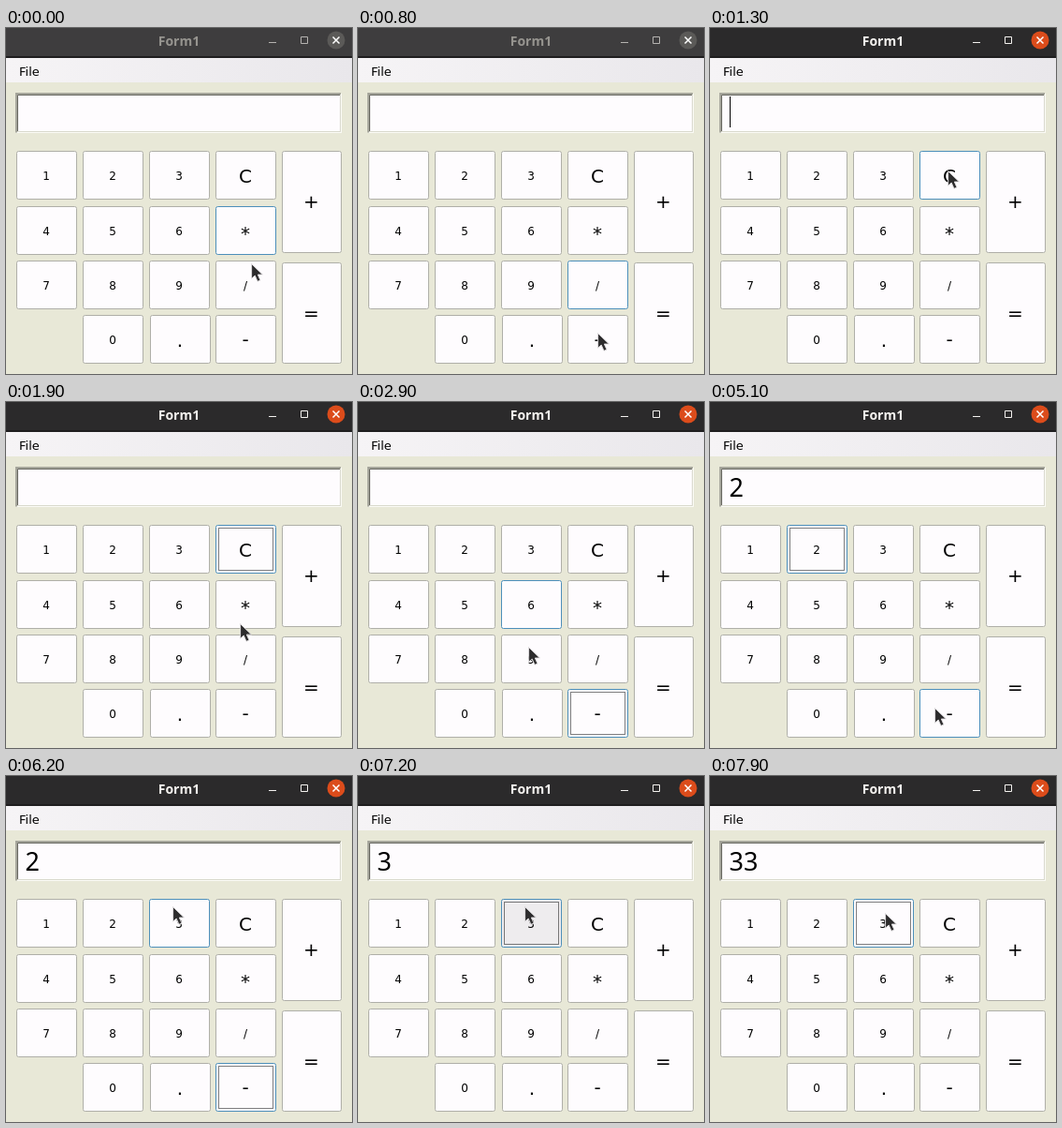
Recreate the animation shown at these times as an HTML page. Size 370 by 369 pixels, loop 8 s.

```html
<!DOCTYPE html>
<html lang="en">
<head>
<meta charset="utf-8">
<title>Calculator</title>
<style>
  html, body { margin: 0; width: 100%; height: 100%; overflow: hidden; background: #e8e8d7; }
  svg { display: block; }
  text { font-family: "DejaVu Sans", sans-serif; fill: #000; }
  .title { font: bold 14px "Noto Sans", sans-serif; fill: #96948f; }
  .bar { fill: #3e3d3e; }
  .close { fill: #5b5a58; }
  .icon { fill: none; stroke: #b5b3b0; }
  .active .title, .active .cross { fill: #f4f2ef; }
  .active .bar { fill: #2b2a2b; }
  .active .close { fill: #dc4c1b; }
  .active .icon { stroke: #f4f2ef; }
  .value { font: 27px "Noto Sans", sans-serif; }
  .key rect { fill: #fefcfe; stroke: #afafa8; }
  .key text { text-anchor: middle; }
  .key .ring { fill: none; stroke: #000; stroke-dasharray: 1 1; visibility: hidden; }
  .key.hover .face, .key.focus .face { stroke: #4d8fba; }
  .key.focus .ring { visibility: visible; }
  .key.press .face { fill: #eeecee; }
</style>
</head>
<body>
<svg id="stage" width="370" height="369" viewBox="0 0 370 369">
  <defs>
    <linearGradient id="menu">
      <stop offset="0" stop-color="#f6f4f6"/>
      <stop offset="1" stop-color="#e9e7eb"/>
    </linearGradient>
  </defs>
  <rect width="370" height="369" fill="#e8e8d7"/>
  <rect class="bar" width="370" height="32"/>
  <rect y="30" width="370" height="2" fill="#1f1e1f"/>
  <text class="title" x="185" y="19" text-anchor="middle">Form1</text>
  <path class="icon" d="M281 15.5h8M315.5 9.5h7v7h-7z"/>
  <circle class="close" cx="353" cy="13" r="9.5"/>
  <path d="M349.5 9.5l7 7m0-7l-7 7" stroke="#fff" stroke-width="1.5"/>
  <rect y="32" width="370" height="26" fill="url(#menu)"/>
  <text x="14" y="51" font-size="13">File</text>

  <rect x="11" y="70" width="348" height="42" fill="#fbfbf6"/>
  <path d="M11 111.5V70H358" fill="none" stroke="#a5a59b" stroke-width="2"/>
  <rect x="12" y="71" width="346" height="40" fill="#d9d9cd"/>
  <path d="M12.5 110V71.5H357" fill="none" stroke="#666660"/>
  <rect x="13" y="72" width="344" height="38" fill="#fefcfe"/>
  <text id="value" class="value" x="20.5" y="100.5"></text>
  <path id="caret" d="M21.5 73V106" stroke="#000"/>

  <g id="keys"></g>
  <path id="cursor" d="M.6 .6V16.2L4.2 13L7 19.3L10 18L7.3 12H12.4Z"
    fill="#2d2c2d" stroke="#e6e4e6" stroke-width=".9" stroke-linejoin="round"/>
</svg>
<script>
const LOOP = 8000, STEP = 100;
const $ = id => document.getElementById(id);

// Keypad: label, x, y, width, height, font size, text shift
const cols = [11, 82, 153, 224], rows = [131, 190, 248, 306];
const keys = {};

function addKey(label, x, y, size = 12, h = 52, w = 65, shift = 0) {
  const g = document.createElementNS('http://www.w3.org/2000/svg', 'g');
  const base = y + h / 2 + (size > 12 ? 7.5 : 4.5) + shift;
  g.innerHTML =
    `<rect class="face" x="${x + .5}" y="${y + .5}" width="${w - 1}" height="${h - 1}" rx="2"/>` +
    `<rect class="ring" x="${x + 3.5}" y="${y + 3.5}" width="${w - 7}" height="${h - 7}"/>` +
    `<text x="${x + w / 2 - .5}" y="${base}" font-size="${size}">${label}</text>`;
  $('keys').append(g);
  keys[label] = { g, x, y, w, h };
}

for (let n = 1; n <= 9; n++) addKey(n, cols[(n - 1) % 3], rows[Math.floor((n - 1) / 3)]);
addKey('0', cols[1], rows[3]);
addKey('.', cols[2] + 1, rows[3], 20);
addKey('C', cols[3], rows[0], 20);
addKey('*', cols[3], rows[1], 20, 52, 65, 2);
addKey('/', cols[3], rows[2]);
addKey('-', cols[3], rows[3], 20, 52, 65, -1);
addKey('+', 295, 131, 20, 109, 64, -1);
addKey('=', 295, 250, 20, 108, 64, -1);

// Pointer stops: time, x, y
const path = [
  [-100, 263, 290], [0, 262, 251], [100, 260, 190], [200, 258, 160], [300, 259, 205],
  [400, 259, 262], [500, 259, 262], [600, 258, 290], [800, 256, 325], [1100, 254, 152],
  [1600, 254, 152], [1700, 249, 200], [1800, 249, 200], [2100, 252, 340], [2800, 252, 340],
  [2900, 182, 261], [3000, 160, 228], [3400, 105, 149], [4400, 105, 149], [5100, 240, 326],
  [5700, 240, 326], [6200, 178, 139], [7800, 178, 139], [7900, 187, 146]
];

// Changes of state, each adding to the ones before
const events = [
  [0, { active: false, caret: false, text: '', focus: '', press: '', grab: '' }],
  [1300, { active: true, caret: true }],
  [1400, { caret: false, press: 'C', grab: 'C' }],
  [1500, { focus: 'C', press: '' }],
  [1900, { grab: '' }],
  [2400, { focus: '-' }],
  [3800, { focus: '' }],
  [4000, { focus: '2', text: '2' }],
  [5400, { focus: '-' }],
  [6700, { focus: '3', text: '3' }],
  [7200, { press: '3' }],
  [7300, { press: '', text: '33' }]
];

function pointer(t) {
  const i = path.findIndex(p => p[0] >= t);
  if (i < 0) return path.at(-1).slice(1);
  if (i === 0) return path[0].slice(1);
  const [t0, x0, y0] = path[i - 1], [t1, x1, y1] = path[i];
  const u = (t - t0) / (t1 - t0), k = u * u * (3 - 2 * u);
  return [Math.round(x0 + (x1 - x0) * k), Math.round(y0 + (y1 - y0) * k)];
}

function keyAt([x, y]) {
  return Object.keys(keys).find(name => {
    const k = keys[name];
    return x >= k.x && x < k.x + k.w && y >= k.y && y < k.y + k.h;
  });
}

function render(t) {
  const state = Object.assign({}, ...events.filter(e => e[0] <= t).map(e => e[1]));
  const pos = pointer(t);
  // The highlight runs one step ahead of a moving pointer
  const moving = String(pos) !== String(pointer(t - STEP));
  const hover = state.grab || keyAt(moving ? pointer(t + STEP) : pos);

  $('stage').classList.toggle('active', state.active);
  $('caret').style.visibility = state.caret ? 'visible' : 'hidden';
  $('value').textContent = state.text;
  $('cursor').setAttribute('transform', `translate(${pos})`);
  for (const name in keys) {
    const list = keys[name].g.classList;
    list.add('key');
    list.toggle('hover', name === hover);
    list.toggle('focus', name === state.focus);
    list.toggle('press', name === state.press);
  }
}

let last = -1;
function tick() {
  const t = Math.floor(performance.now() % LOOP / STEP) * STEP;
  if (t !== last) render(last = t);
  requestAnimationFrame(tick);
}
tick();
</script>
</body>
</html>
```
